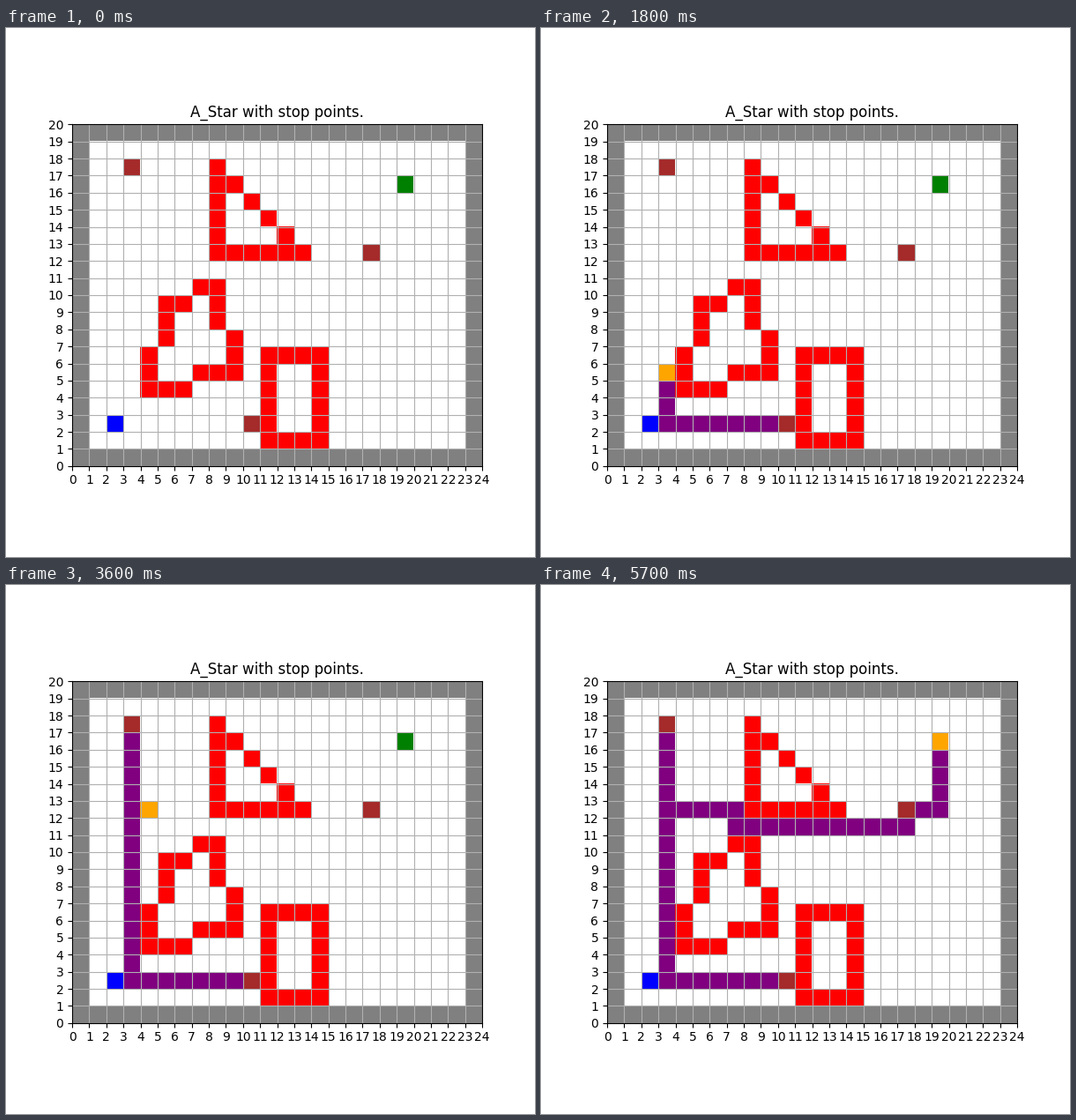
Animation of 600x600 px, one loop 5800 ms. Source, as a matplotlib script:

```python
import matplotlib.pyplot as plt
import numpy as np
from matplotlib.animation import FuncAnimation
from matplotlib.colors import ListedColormap

W, H = 24, 20
COLORS = ["white", "gray", "red", "blue", "green", "brown", "purple", "orange"]
FREE, WALL, BLOCK, START, GOAL, STOP, TRAIL, ROBOT = range(len(COLORS))

start, goal = (2, 2), (19, 16)
stops = [(10, 2), (3, 17), (17, 12)]
outlines = [
    [(8, 17), (8, 12), (13, 12)],
    [(11, 1), (14, 1), (14, 6), (11, 6)],
    [(4, 4), (6, 4), (7, 5), (9, 5), (9, 7), (8, 8),
     (8, 10), (7, 10), (6, 9), (5, 9), (5, 7), (4, 6)],
]


def draw_outline(grid, corners):
    """Fill the cells along a closed polygon."""
    for a, b in zip(corners, corners[1:] + corners[:1]):
        n = max(abs(b[0] - a[0]), abs(b[1] - a[1])) + 1
        xs, ys = np.linspace(a, b, n).round().astype(int).T
        grid[ys, xs] = BLOCK


def paint(grid, cells, kind):
    for x, y in cells:
        grid[y, x] = kind


def steer(grid, pos, target):
    """Step to the free neighbour nearest the target; ties go by move order."""
    while pos != target:
        x, y = pos
        moves = [(x, y - 1), (x - 1, y), (x + 1, y), (x, y + 1)]
        free = [(i, j) for i, j in moves if grid[j, i] == FREE]
        pos = min(free, key=lambda c: abs(c[0] - target[0]) + abs(c[1] - target[1]))
        yield pos


base = np.full((H, W), WALL)
base[1:-1, 1:-1] = FREE
for corners in outlines:
    draw_outline(base, corners)

path = [start]
for target in stops + [goal]:
    path += steer(base, path[-1], target)


def board(step):
    grid = base.copy()
    paint(grid, path[:step], TRAIL)
    paint(grid, stops, STOP)
    paint(grid, [goal], GOAL)
    paint(grid, [path[step]], ROBOT)
    paint(grid, [start], START)
    return grid


fig, ax = plt.subplots(figsize=(6, 6), dpi=100)
image = ax.imshow(board(0), cmap=ListedColormap(COLORS), origin="lower",
                  extent=(0, W, 0, H), interpolation="nearest",
                  vmin=-0.5, vmax=len(COLORS) - 0.5)
ax.set_xticks(range(W + 1))
ax.set_yticks(range(H + 1))
ax.grid(True)
ax.set_title("A_Star with stop points.")


def update(step):
    image.set_data(board(step))
    return [image]


anim = FuncAnimation(fig, update, frames=len(path), interval=100,
                     init_func=lambda: update(0), repeat=True, repeat_delay=0)
plt.show()
```
